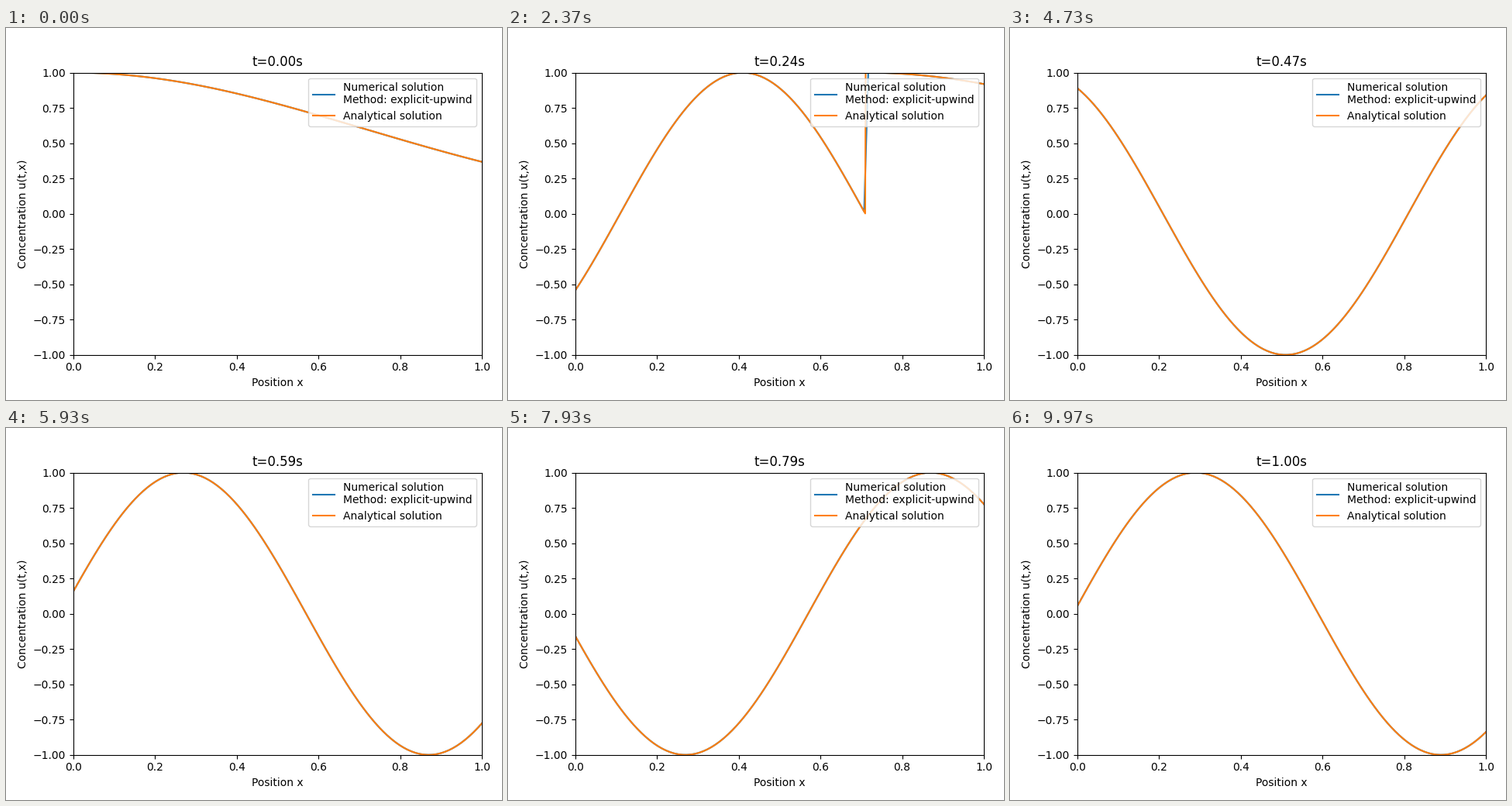
Recreate the animation shown at these times as a matplotlib script. Size 640 by 480 pixels, loop 10000 ms.

```python
import numpy as np
import matplotlib.pyplot as plt
from matplotlib.animation import FuncAnimation

FRAMES = 300
LOOP_MS = 10000
SPEED = 3.0
OMEGA = 5 * np.pi


def concentration(t, x):
    """Advected Gaussian, followed by a sine wave entering at x = 0."""
    shift = x - SPEED * t
    return np.where(shift < 0, np.sin(-OMEGA * shift / SPEED), np.exp(-shift**2))


fig, ax = plt.subplots(figsize=(6.4, 4.8), dpi=100)
x_coarse = np.linspace(0, 1, 100)
x_fine = np.linspace(0, 1, 1000)

numerical, = ax.plot(x_coarse, concentration(0, x_coarse),
                     label="Numerical solution\nMethod: explicit-upwind")
analytical, = ax.plot(x_fine, concentration(0, x_fine),
                      label="Analytical solution")
ax.set_xlim(0, 1)
ax.set_ylim(-1, 1)
ax.set_xlabel("Position x")
ax.set_ylabel("Concentration u(t,x)")
title = ax.set_title("t=0.00s")
ax.legend(loc="upper right")
fig.tight_layout()
fig.subplots_adjust(top=0.88)


def update(i):
    t = i / FRAMES
    numerical.set_ydata(concentration(t, x_coarse))
    analytical.set_ydata(concentration(t, x_fine))
    title.set_text(f"t={t:.2f}s")
    return numerical, analytical, title


anim = FuncAnimation(fig, update, frames=FRAMES, interval=LOOP_MS / FRAMES,
                     repeat=True, repeat_delay=0)
plt.show()
```
